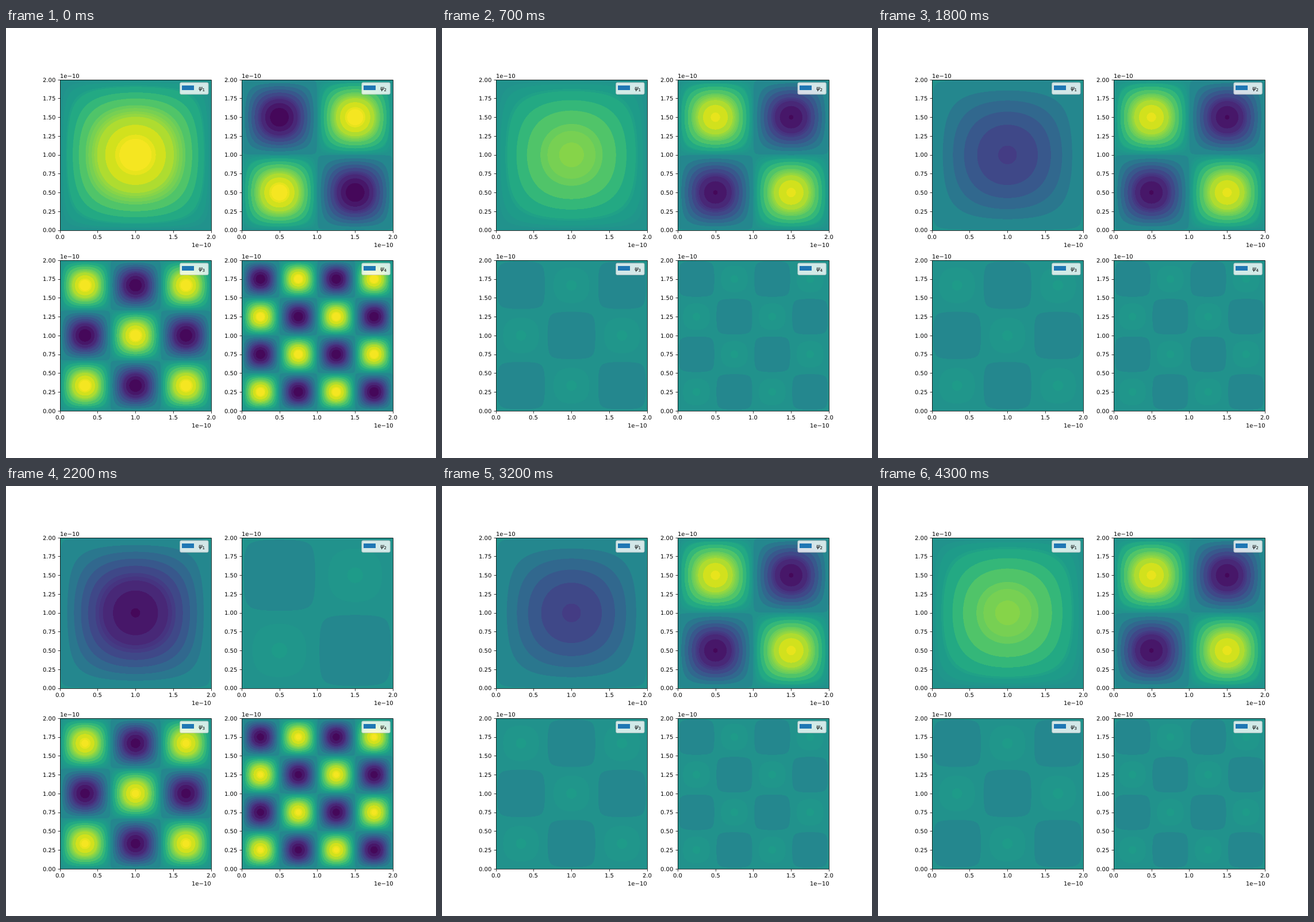
An HTML page with a canvas that plays this animation: 748x748 px, repeating every 4400 ms.

```html
<!DOCTYPE html>
<html lang="en">
<head>
<meta charset="utf-8">
<title>Standing waves in a square well</title>
<style>
  html, body { margin: 0; width: 100%; height: 100%; overflow: hidden; background: #fff; }
  canvas, svg { position: absolute; left: 0; top: 0; }
  text { font: 10px "DejaVu Sans", sans-serif; text-rendering: geometricPrecision; }
</style>
</head>
<body>
<canvas id="field" width="748" height="748"></canvas>
<svg id="axes" width="748" height="748"></svg>
<script>
const FRAME_MS = 100, FRAMES = 44, PERIOD = 50;
const WIDTH = 263.5, HEIGHT = 261.8;
const SAMPLES = 526; // two samples per pixel
const panels = [1, 2, 3, 4].map(n => ({
  n,
  x: 93.5 + (n - 1) % 2 * 316.2,
  y: 89.76 + (n > 2 ? 314.16 : 0)
}));

// Viridis, sampled at steps of 0.05
const viridis = ['440154', '471365', '482475', '463480', '414487', '3b528b', '355f8d',
  '2f6c8e', '2a788e', '25848e', '21918c', '1e9c89', '22a884', '2fb47c', '44bf70',
  '5ec962', '7ad151', '9bd93c', 'bddf26', 'dfe318', 'fde725']
  .map(hex => [0, 2, 4].map(i => parseInt(hex.slice(i, i + 2), 16)));

function colormap(t) {
  const pos = t * (viridis.length - 1);
  const i = Math.min(viridis.length - 2, Math.floor(pos));
  return viridis[i].map((c, k) => Math.round(c + (viridis[i + 1][k] - c) * (pos - i)));
}

// Contour levels of the filled bands; each band takes the colour of its middle
const levels = [-1, -.925, -.83, -.725, -.675, -.625, -.515, -.395, -.27, -.145, -.006,
  .028, .06, .125, .15, .265, .385, .51, .56, .617, .655, .7, .81, .912, .945, 1];
const LUT_HALF = 1000;
const lut = new Uint32Array(2 * LUT_HALF + 1);
for (let i = 0, band = 0; i < lut.length; i++) {
  const value = i / LUT_HALF - 1;
  while (band < levels.length - 2 && value >= levels[band + 1]) band++;
  const [r, g, b] = colormap(((levels[band] + levels[band + 1]) / 2 + 1) / 2);
  lut[i] = (255 << 24 | b << 16 | g << 8 | r) >>> 0;
}

const ctx = document.getElementById('field').getContext('2d');
const buffer = document.createElement('canvas');
buffer.width = buffer.height = SAMPLES;
const bufferCtx = buffer.getContext('2d');
const image = bufferCtx.createImageData(SAMPLES, SAMPLES);
const pixels = new Uint32Array(image.data.buffer);

for (const p of panels) {
  p.wave = Float64Array.from({ length: SAMPLES },
    (_, i) => Math.sin(p.n * Math.PI * (i + .5) / SAMPLES));
}

function drawPanel({ n, x, y, wave }, frame) {
  const amplitude = Math.cos(2 * Math.PI * n * n * frame / PERIOD);
  for (let row = 0, k = 0; row < SAMPLES; row++) {
    const scale = amplitude * wave[SAMPLES - 1 - row] * LUT_HALF;
    for (let col = 0; col < SAMPLES; col++) {
      pixels[k++] = lut[Math.round(LUT_HALF + scale * wave[col])];
    }
  }
  bufferCtx.putImageData(image, 0, 0);
  ctx.drawImage(buffer, x, y, WIDTH, HEIGHT);
}

// Lines sit on pixel centres, text starts on whole pixels
const snap = v => Math.round(v) + .5;
ctx.font = '10px "DejaVu Sans", sans-serif';
ctx.textRendering = 'geometricPrecision';
function label(x, y, align, text) {
  const start = Math.round(x - align * ctx.measureText(text).width);
  return `<text x="${start}" y="${Math.round(y)}">${text}</text>`;
}

function axesMarkup({ n, x, y }) {
  const right = x + WIDTH, bottom = y + HEIGHT;
  const left = snap(x), top = snap(y), base = snap(bottom);
  let ticks = '', labels = '';
  for (let i = 0; i <= 4; i++) {
    const tx = x + WIDTH * i / 4;
    ticks += `M${snap(tx)} ${base}v4`;
    labels += label(tx, bottom + 15.3, .5, (i / 2).toFixed(1));
  }
  for (let i = 0; i <= 8; i++) {
    const ty = bottom - HEIGHT * i / 8;
    ticks += `M${left} ${snap(ty)}h-4`;
    labels += label(x - 7, ty + 3.8, 1, (i / 4).toFixed(2));
  }
  labels += label(x, y - 3, 0, '1e−10') + label(right, bottom + 29.3, 1, '1e−10');
  const legendX = right - 54.3;
  return `<path d="M${left} ${top}H${snap(right)}V${base}H${left}Z${ticks}"
      fill="none" stroke="#000" stroke-width=".8"/>${labels}
    <rect x="${legendX}" y="${y + 5.2}" width="49.3" height="20.3" rx="2"
      fill="#fff" stroke="#ccc" opacity=".8"/>
    <rect x="${Math.floor(legendX + 4)}" y="${Math.round(y + 10.4)}" width="21" height="8"
      fill="#1f77b4"/>
    <text x="${Math.round(legendX + 32.2)}" y="${Math.round(y + 18)}"><tspan
      font-style="italic">ψ</tspan><tspan dy="1.6" style="font-size:7px">${n}</tspan></text>`;
}
document.getElementById('axes').innerHTML = panels.map(axesMarkup).join('');

let shown = -1;
const start = performance.now();
function tick() {
  const frame = Math.floor((performance.now() - start) / FRAME_MS) % FRAMES;
  if (frame !== shown) {
    shown = frame;
    panels.forEach(p => drawPanel(p, frame));
  }
  requestAnimationFrame(tick);
}
tick();
</script>
</body>
</html>
```
